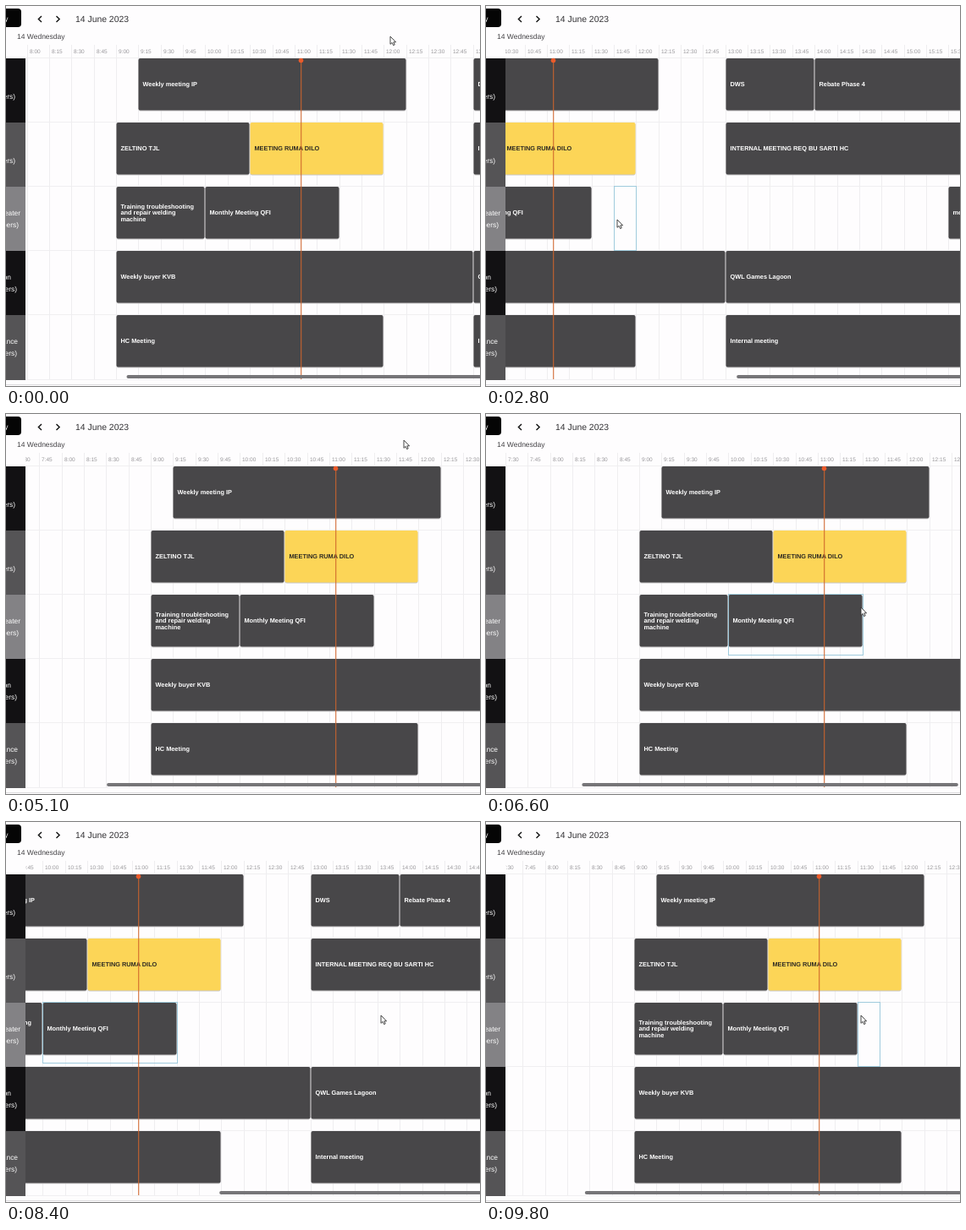
Recreate the animation shown at these times as an HTML page. Size 560 px wide and 450 px high, loop 9.9 s.

```html
<!DOCTYPE html>
<html lang="en">
<head>
<meta charset="utf-8">
<title>Room schedule</title>
<style>
  html, body { margin: 0; width: 100%; height: 100%; overflow: hidden; background: #fefdfe; }
  svg { display: block; font-family: "Liberation Sans", Arial, sans-serif; text-rendering: geometricPrecision; }
  .title { font-size: 7.35px; font-weight: bold; }
  .hour { font-size: 6.5px; fill: #98979a; }
  .room { font-size: 8.4px; fill: #fff; text-anchor: end; }
</style>
</head>
<body>
<svg id="stage" width="560" height="450" viewBox="0 0 560 450"></svg>
<script>
const LOOP = 9900, QUARTER = 26.36, TOP = 62, ROW = 76.1;
const stage = document.getElementById('stage');
const quarterX = q => Math.round(q * QUARTER);
const rowY = r => Math.round(TOP + r * ROW);

function add(parent, tag, attrs, text) {
  const el = document.createElementNS('http://www.w3.org/2000/svg', tag);
  for (const key in attrs) el.setAttribute(key, attrs[key]);
  if (text) el.textContent = text;
  return parent.appendChild(el);
}
const box = (parent, x, y, width, height, fill, rx = 0) =>
  add(parent, 'rect', { x, y, width, height, fill, rx });

// Grid rows stay put; everything in "board" scrolls sideways.
for (let r = 0; r <= 5; r++) box(stage, 23, rowY(r) - 1, 537, 1, '#f0eff1');
const board = add(stage, 'g', {});

// Quarters are counted from 9:00.
for (let q = -12; q < 36; q++) {
  const x = quarterX(q), minutes = 540 + q * 15;
  box(board, x, 46, 1, 396, '#efeef0');
  const label = Math.floor(minutes / 60) + ':' + String(minutes % 60).padStart(2, '0');
  add(board, 'text', { x: x + 3, y: 55.8, class: 'hour' }, label);
}

const meetings = [
  [0, 1, 13, 'Weekly meeting IP'],
  [0, 16, 20, 'DWS'],
  [0, 20, 32, 'Rebate Phase 4'],
  [1, 0, 6, 'ZELTINO TJL'],
  [1, 6, 12, 'MEETING RUMA DILO', '#fcd557', '#2d2a22'],
  [1, 16, 32, 'INTERNAL MEETING REQ BU SARTI HC'],
  [2, 0, 4, 'Training troubleshooting|and repair welding|machine'],
  [2, 4, 10, 'Monthly Meeting QFI'],
  [2, 26, 32, 'meeting'],
  [3, 0, 16, 'Weekly buyer KVB'],
  [3, 16, 32, 'QWL Games Lagoon'],
  [4, 0, 12, 'HC Meeting'],
  [4, 16, 32, 'Internal meeting']
];
for (const [row, from, to, title, fill = '#484749', ink = '#fff'] of meetings) {
  const x = quarterX(from), y = rowY(row);
  box(board, x + .5, y + .5, quarterX(to) - x - 1, 62, '#c9c8ca', 2);
  box(board, x + .5, y, quarterX(to) - x - 1, 61.5, fill, 2);
  const lines = title.split('|');
  lines.forEach((line, i) => add(board, 'text', {
    x: x + 5.5, y: y + 33.2 + (i - (lines.length - 1) / 2) * 7.3, fill: ink, class: 'title'
  }, line));
}
const outline = add(board, 'rect', { fill: 'none', stroke: '#9fcbdd', 'stroke-width': 1 });
box(board, 218, TOP, 1.3, 380, '#d0662c').setAttribute('opacity', .8);
add(board, 'circle', { cx: 218.5, cy: 64.5, r: 2.8, fill: '#ea5a2a' });

// Fixed room column
box(stage, 0, 44, 23, 18, '#fefdfe');
['#121113', '#555456', '#838285', '#121113', '#555456'].forEach((fill, r) =>
  box(stage, 0, rowY(r), 23, rowY(r + 1) - rowY(r), fill));
[
  [11, 110, 'members)'], [11, 186, 'members)'],
  [17, 247.5, 'Theater'], [15, 262, 'members)'],
  [6, 323.5, 'Salon'], [13, 338, 'members)'],
  [14, 399.5, 'Entrance'], [13, 414, 'members)']
].forEach(([x, y, text]) => add(stage, 'text', { x, y, class: 'room' }, text));

// Toolbar
box(stage, -40, 3, 58, 22, '#050505', 4);
add(stage, 'text', { x: 2.5, y: 17.5, fill: '#fff', 'font-size': 8.5, 'text-anchor': 'end' }, 'Today');
add(stage, 'path', {
  d: 'M42 12L38.4 15.5L42 19M59.5 12L63.1 15.5L59.5 19',
  fill: 'none', stroke: '#111', 'stroke-width': 1.4
});
add(stage, 'text', { x: 82, y: 18.8, fill: '#333235', 'font-size': 10.4 }, '14 June 2023');
add(stage, 'text', { x: 13, y: 38.6, fill: '#444346', 'font-size': 8.5 }, '14 Wednesday');

box(stage, 0, 448, 560, 1, '#dddcde');
const bar = box(stage, 0, 437, 444.5, 4, '#767578', 2);
const cursor = add(stage, 'path', {
  d: 'M0 0V9.3L2.1 7.4L3.6 10.6L5.2 9.9L3.8 6.8H6.6Z',
  fill: '#fff', stroke: '#333', 'stroke-width': .9
});

// Smooth curve through [time, value] points that never overshoots.
function curve(points) {
  const slope = i => (points[i + 1][1] - points[i][1]) / (points[i + 1][0] - points[i][0]);
  const tangent = points.map((p, i) => {
    if (!i || i === points.length - 1) return 0;
    const a = slope(i - 1), b = slope(i);
    return a * b > 0 ? 2 * a * b / (a + b) : 0;
  });
  return t => {
    if (t <= points[0][0]) return points[0][1];
    const i = points.findIndex(p => p[0] >= t) - 1;
    if (i < 0) return points[points.length - 1][1];
    const [t0, a] = points[i], [t1, b] = points[i + 1];
    const d = t1 - t0, u = (t - t0) / d, v = 1 - u;
    return v * v * (1 + 2 * u) * a + u * u * (3 - 2 * u) * b
      + d * u * v * (v * tangent[i] - u * tangent[i + 1]);
  };
}

const scroll = curve([
  [1500, 130], [2100, 47], [2800, -139], [3050, -150], [4000, 125], [4400, 154],
  [4500, 154], [5500, 181], [6700, 181], [8250, -66], [8400, -62], [9700, 175]
]);
const cursorX = curve([
  [0, 454], [1400, 425], [1500, 425], [2100, 334], [2800, 155], [3000, 146],
  [4000, 449], [4400, 457], [5000, 470], [5500, 470], [6000, 443]
]);
const cursorY = curve([
  [0, 36], [500, 80], [1000, 190], [1400, 237], [2100, 239], [2800, 253],
  [4000, 238], [4500, 237], [5000, 22], [5500, 140], [6000, 229]
]);

// [time, row, from, to, height]; a missing row hides the outline.
const hovers = [
  [0], [400, 0, 1, 13, 72], [800, 1, 6, 12, 72], [1100, 2, 11, 12, 76],
  [4700, 1, 6, 12, 72], [4800, 0, 1, 13, 72], [5000], [5200, 0, 1, 13, 72],
  [5500, 1, 6, 12, 72], [5900, 2, 4, 10, 72], [9600, 2, 10, 11, 76]
];

function draw(t) {
  const x = Math.round(scroll(t));
  board.setAttribute('transform', `translate(${x})`);
  bar.setAttribute('x', 142.5 + (130 - x) * .571);
  cursor.setAttribute('transform', `translate(${cursorX(t)} ${cursorY(t)})`);
  const [, row, from, to, height] = hovers.filter(h => h[0] <= t).pop();
  outline.setAttribute('visibility', row === undefined ? 'hidden' : 'visible');
  if (row === undefined) return;
  const left = quarterX(from);
  const size = { x: left + .5, y: rowY(row) - .5, width: quarterX(to) - left, height };
  for (const key in size) outline.setAttribute(key, size[key]);
}

const start = performance.now();
function tick() {
  const t = (performance.now() - start) % LOOP;
  draw(Math.floor(t / 100) * 100);
  requestAnimationFrame(tick);
}
tick();
</script>
</body>
</html>
```
